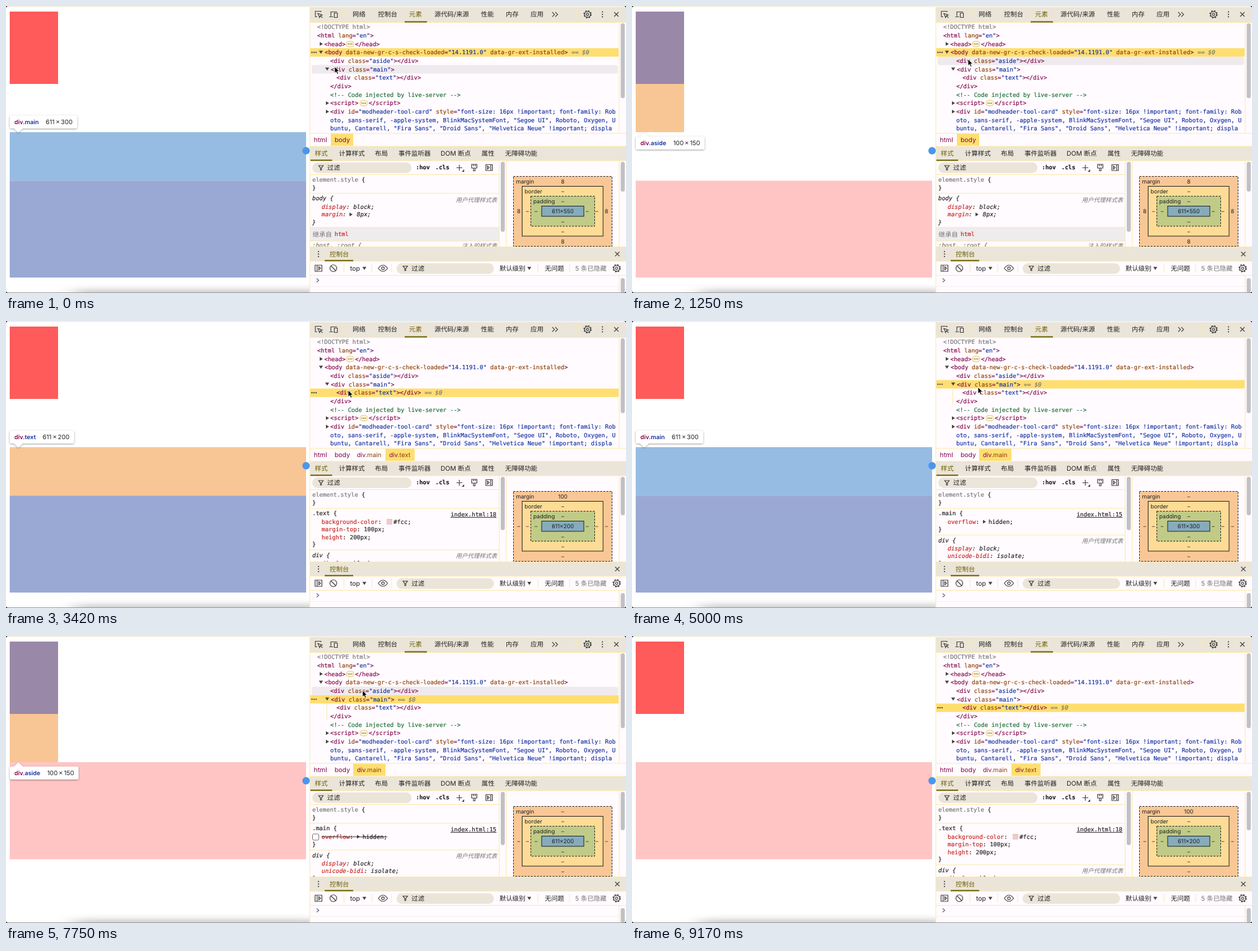
An HTML page that plays this animation: 1000x464 px, repeating every 9.26 s.

```html
<!DOCTYPE html>
<html lang="en">
<head>
<meta charset="utf-8">
<title>Inspector demo</title>
<style>
html, body { margin: 0; width: 100%; height: 100%; overflow: hidden; background: #fff; }
svg { display: block; width: 100%; height: 100%; }
text { white-space: pre; text-rendering: geometricPrecision; font-size: 10.4px; fill: #1f1f1f;
  font-family: Inter, "Noto Sans CJK SC", "Noto Sans CJK", sans-serif; }
.m { font-size: 9.45px; font-family: "DejaVu Sans Mono", "Liberation Mono", monospace; stroke: #1f1f1f; stroke-width: .16px; }
.tag { fill: #83064a; } .attr { fill: #8c3f06; } .val { fill: #12309f; }
.note { fill: #146c2e; } .dim { fill: #757575; } .prop { fill: #c5221f; }
.m.tag, .m .tag { stroke: #83064a; } .m .attr { stroke: #8c3f06; }
.m.val, .m .val { stroke: #12309f; } .m.note { stroke: #146c2e; }
.m.dim, .m .dim { stroke: #757575; } .m.prop, .m .prop { stroke: #c5221f; }
.i { font-style: italic; } .b { font-weight: 600; } .on { fill: #6d5e00; }
.bm { font-size: 9px; } .mid { text-anchor: middle; } .end { text-anchor: end; }
.ua { font-size: 9.5px; font-style: italic; fill: #757575; text-anchor: end; }
.tip { font-size: 10px; } .tip.b { font-size: 9.6px; }
.ic { fill: none; stroke: #46443f; stroke-width: 1.2; }
</style>
</head>
<body>
<svg id="stage" viewBox="0 0 1000 464" preserveAspectRatio="none"></svg>
<script>
const BG = '#fffbff', BAR = '#ebe5d9', LINE = '#fbe9a8', GOLD = '#ffde70', THUMB = '#c1c0c2', OLIVE = '#6d5e00';
const CH = 5.69, ROW = 13.67;
const rowY = i => 34 + ROW * i;

const esc = s => s.replace(/&/g, '&amp;').replace(/</g, '&lt;');
const span = (c, s) => `<tspan class="${c}">${esc(s)}</tspan>`;
const box = (x, y, x2, y2, fill, more = '') =>
  `<rect x="${x}" y="${y}" width="${x2 - x}" height="${y2 - y}" fill="${fill}" ${more}/>`;
const path = (d, more = 'class="ic"') => `<path d="${d}" ${more}/>`;
const fillPath = (d, c = '#46443f') => path(d, `fill="${c}"`);
const raw = (x, y, s, c = '', more = '') => `<text x="${x}" y="${y}" class="${c}" ${more}>${s}</text>`;
const label = (x, y, s, c = '') => raw(x, y + 3.8, esc(s), c);
const mono = (x, y, s, c = '') => raw(x, y + 3.4, s, 'm ' + c);
const hline = (x, x2, y, c = LINE) => box(x, y - .5, x2, y + .5, c);
const vline = (x, y, y2, c = LINE) => box(x - .5, y, x + .5, y2, c);
const underline = (x, x2, y) => box(x, y, x2, y + 2, OLIVE);
const dot = (x, y, r, c = '#46443f') => `<circle cx="${x}" cy="${y}" r="${r}" fill="${c}"/>`;
const ring = (x, y, r, more = '') => `<circle cx="${x}" cy="${y}" r="${r}" class="ic" ${more}/>`;
const group = (name, s) => `<g data-on="${name}">${s}</g>`;

const right = (x, y) => fillPath(`M${x - 2} ${y - 3}l5 3l-5 3z`);
const down = (x, y) => fillPath(`M${x - 3.2} ${y - 2.3}h6.4l-3.2 5z`);
const kebab = (x, y) => [-4, 0, 4].map(d => dot(x, y + d, 1.1)).join('');
const cross = (x, y) => path(`M${x - 3.5} ${y - 3.5}l7 7m0-7l-7 7`);
const gear = (x, y) => ring(x, y, 4.7) + ring(x, y, 5.8, 'style="stroke-width:1.6" stroke-dasharray="2.4 2.155"') + ring(x, y, 1.9);
const funnel = (x, y) => path(`M${x - 3.6} ${y - 3.5}h7.2l-2.8 3.8v3.4h-1.6v-3.4z`);
const pill = (x, y) => `<rect x="${x - 6}" y="${y - 4.3}" width="12" height="8.8" rx="4" fill="#fff8e6" stroke="#e8c969"/>` +
  [-2.7, 0, 2.7].map(d => dot(x + d, y, .9, '#6b5d20')).join('');

// Markup colouring
const code = s => s.replace(/("[^"]*"?)|(<\/?\w+|\/?>)|([\w-]+)/g,
  (m, v, t) => span(v ? 'val' : t ? 'tag' : 'attr', m));
const markup = (x, i, s) => mono(x, rowY(i), code(s), 'tag');

function page() {
  const overlay = (name, y, y2, c) => group(name, box(6, y, 484, y2, c));
  const tip = (name, x2, y, up, sel, w, h, sx) => group(name,
    `<g filter="url(#soft)">${box(6, y, x2, y + 21, '#fff', 'rx="3"')}` +
    fillPath(up ? `M13 ${y}l7-6.5l7 6.5z` : `M13 ${y + 21}l7 6.5l7-6.5z`, '#fff') + '</g>' +
    raw(13.5, y + 14, span('tag', 'div') + span('val', sel), 'tip b') +
    raw(sx, y + 14, `${w}\u2009×\u2009${h}`, 'tip'));
  return box(0, 0, 490, 464, '#fff') +
    box(6, 9, 84, 126, '#ff5b5b') +
    group('open', box(6, 282.4, 484, 439, '#ffc5c5')) +
    group('folded', box(6, 204, 484, 361, '#ffc5c5')) +
    group('tip-aside', box(6, 9, 84, 126, '#9a88a9') + box(6, 126, 84, 204, '#f8c694')) +
    overlay('main-open', 204, 282.4, '#97bce3') + overlay('main-open', 282.4, 439, '#99a9d3') +
    overlay('text-open', 204, 282.4, '#f8c694') + overlay('text-open', 282.4, 439, '#99a9d3') +
    overlay('text-folded', 126, 204, '#f8c694') +
    overlay('text-folded', 204, 361, '#99a9d3') + overlay('main-folded', 204, 361, '#99a9d3') +
    tip('tip-aside', 117, 211, true, '.aside', 100, 150, 66.5) +
    tip('tip-main', 115, 177, false, '.main', 611, 300, 64) +
    tip('main-folded', 115, 177, false, '.main', 611, 200, 64) +
    tip('text-open', 110, 177, false, '.text', 611, 200, 59) +
    tip('text-folded', 110, 99, false, '.text', 611, 200, 59) +
    `<rect x="110" y="460" width="400" height="14" fill="#777" opacity=".5" filter="url(#blur)"/>`;
}

function tabs() {
  const names = [[559, '网络'], [600, '控制台'], [691, '源代码/来源'], [766, '性能'], [806, '内存'], [846, '应用']];
  return box(490, 2, 1000, 26, BAR) + hline(490, 1000, 26.5) +
    path('M508 10v-1.5h-9v9h3') + path('M503 12l7 2.5l-3 1.2l-1.2 3zM507 15.5l3.5 3.5') +
    path('M524 16.5v-7h10M521.5 17.5h6') + path('M529.5 11.5h5v7h-5z') +
    vline(546, 7, 20) + names.map(([x, s]) => label(x, 13.5, s)).join('') +
    label(650, 13.5, '元素', 'on') + underline(643, 679, 24.6) + path('M881 10l3.7 3.7l-3.7 3.7M886 10l3.7 3.7l-3.7 3.7') +
    vline(920, 7, 20) + gear(938, 13.5) + kebab(962, 13.5) + vline(973, 7, 20) + cross(984.5, 13.5);
}

function tree() {
  const band = (name, i, c) => group(name, box(490.5, rowY(i) - 6.8, 988, rowY(i) + 6.8, c));
  const hover = (name, i) => group('row-' + name, box(493, rowY(i) - 6.8, 987, rowY(i) + 6.8, '#eeeaee', 'rx="4"'));
  const mark = (name, i, x) => group(name, mono(x, rowY(i), ` == ${span('i', '$0')}`, 'dim') +
    [493.5, 496.8, 500.1].map(d => dot(d, rowY(i), 1.15)).join(''));
  const open = (x, i) => down(x, rowY(i) - .5), shut = (x, i) => right(x, rowY(i));
  return band('sel-body', 3, GOLD) + band('sel-text', 6, GOLD) + band('gold-main', 5, GOLD) + band('pale-main', 5, '#f6eedf') +
    hover('aside', 4) + hover('main', 5) + hover('text', 6) + hover('script', 9) +
    group('sel-main', vline(517.5, 110, 136)) +
    mono(502, rowY(0), esc('<!DOCTYPE html>'), 'dim') +
    markup(502, 1, '<html lang="en">') +
    shut(508, 2) + markup(513.5, 2, '<head>') + pill(555, rowY(2)) + markup(563, 2, '</head>') +
    open(508, 3) + markup(514, 3, '<body data-new-gr-c-s-check-loaded="14.1191.0" data-gr-ext-installed>') +
    markup(523, 4, '<div class="aside"></div>') +
    open(518, 5) + markup(524, 5, '<div class="main">') +
    markup(533, 6, '<div class="text"></div>') + markup(523, 7, '</div>') +
    mono(523, rowY(8), esc('<!-- Code injected by live-server -->'), 'note') +
    shut(518, 9) + markup(523, 9, '<script>') + pill(577, rowY(9)) + markup(585, 9, '<\/script>') +
    shut(518, 10) + markup(523, 10, '<div id="modheader-tool-card" style="font-size: 16px !important; font-family: Rob') +
    mono(523, rowY(11), 'oto, sans-serif, -apple-system, BlinkMacSystemFont, "Segoe UI", Roboto, Oxygen, U', 'val') +
    mono(523, rowY(12), 'buntu, Cantarell, "Fira Sans", "Droid Sans", "Helvetica Neue" !important; displa', 'val') +
    mark('sel-body', 3, 514 + 69 * CH) + mark('sel-main', 5, 524 + 18 * CH) + mark('sel-text', 6, 533 + 24 * CH) +
    vline(989, 27, 205) + box(991.5, 28, 998, 149, THUMB, 'rx="3.2"');
}

function crumbs() {
  const hot = (name, x, x2) => group(name, box(x, 206.5, x2, 226, GOLD));
  const y = 219.8, small = 'style="font-size:10px"';
  return box(490, 205.5, 1000, 227, BG) + hline(490, 1000, 206) +
    hot('sel-body', 524, 560) + hot('sel-main', 560, 612) + hot('sel-text', 612, 659) +
    raw(496.5, y, 'html', 'tag') + raw(530, y, 'body', 'tag') +
    group('crumb-main', raw(566, y, span('tag', 'div') + span('attr', '.main'), '', small)) +
    group('sel-text', raw(618, y, span('tag', 'div') + span('attr', '.text'), '', small));
}

function styleHead() {
  const names = [[537, '计算样式'], [595, '布局'], [633, '事件监听器'], [701, 'DOM 断点'], [767, '属性'], [805, '无障碍功能']];
  return box(490, 227, 1000, 250, BAR) + hline(490, 1000, 227) + hline(490, 1000, 250) +
    names.map(([x, s]) => label(x, 238.3, s)).join('') + label(498, 238.3, '样式', 'on') + underline(491, 526, 248.4) +
    box(494, 253, 654, 270, BAR, 'rx="8.3"') + funnel(508, 261.5) + label(518, 261.3, '过滤') +
    mono(661, 261, ':hov', 'b') + mono(692.5, 261, '.cls', 'b') +
    path('M726.5 261.5h9.5M731.2 256.7v9.5') + fillPath('M739 264v4h-4z') +
    path('M751 256h8.5v6h-8.5zM754 256v3M757 256v3M754 262v4.5h2.5v-4.5') +
    path('M774 256.5h10.5v9.5h-10.5zM781.8 256.5v9.5M776.5 258.8l3 2.5l-3 2.5z') + hline(490, 795, 272.5);
}

function rules() {
  const prop = (y, name, val, c = '') => mono(509, y, span('prop', name) + ': ' + esc(val), c);
  const ua = (y, s) => raw(792, y + 3.4, s, 'ua');
  const link = s => mono(791, 312.5, s, 'end') + hline(717, 791, 317.5, '#333');
  const sep = y => hline(490, 795, y);
  const divRule = y => mono(494, y, 'div {', 'i') + ua(y + 1.5, '用户代理样式表') + prop(y + 12.7, 'display', 'block;', 'i');
  return mono(494, 280.5, span('dim', 'element.style') + ' {') + mono(494, 294, '}') + sep(303) +
    group('sel-body',
      mono(494, 311, 'body {', 'i') + ua(314, '用户代理样式表') +
      prop(324.5, 'display', 'block;', 'i') + prop(337, 'margin', '  8px;', 'i') + right(556, 337) +
      mono(494, 349.5, '}', 'i') + box(490.5, 358, 795, 380, '#efecee') + sep(358) + sep(380) +
      label(494.5, 369, '继承自', 'dim') + mono(530, 369, 'html', 'prop') +
      mono(494, 386.5, ':host, :root {', 'i dim') + ua(388, '注入的样式表')) +
    group('sel-text',
      mono(494, 311, '.text {') + link('index.html:18') +
      mono(509, 324.5, span('prop', 'background-color') + ':') + box(614.5, 320.5, 622.5, 328.5, '#ffc5c5', 'stroke="#bbb" stroke-width=".6"') +
      mono(625, 324.5, '#fcc;') + prop(337, 'margin-top', '100px;') + prop(349.5, 'height', '200px;') +
      mono(494, 361, '}') + sep(370) + divRule(378.5)) +
    group('sel-main',
      mono(494, 311, '.main {') + link('index.html:15') +
      mono(509, 324.5, span('prop', 'overflow') + ':') + right(568, 324.5) + mono(575, 324.5, 'hidden;') +
      mono(494, 337, '}') + sep(346) + divRule(354.5) + prop(379.8, 'unicode-bidi', 'isolate;', 'i') + mono(494, 392, '}', 'i')) +
    group('checked', box(494, 320, 504.5, 330.5, '#1a73e8', 'rx="2"') + path('M496.5 325l2 2.3l4-4.6', 'fill="none" stroke="#fff" stroke-width="1.4"')) +
    group('unchecked', box(494.5, 320, 504.5, 330, '#fff', 'rx="2" stroke="#767676"') + hline(509, 615, 324.8, '#333')) +
    vline(795.5, 250, 390) + vline(807, 250, 390) +
    group('sel-body', box(798, 252, 804.5, 365, THUMB, 'rx="3"')) +
    group('crumb-main', box(798, 252, 804.5, 338, THUMB, 'rx="3"'));
}

function boxModel() {
  const frame = (x, y, x2, y2, c, dash) =>
    box(x + .5, y + .5, x2 - .5, y2 - .5, c, `stroke="#222" ${dash ? 'stroke-dasharray="3 2"' : ''}`);
  const t = (x, y, s, c = 'mid', more = '') => raw(x, y + 3.2, s, 'bm ' + c, more);
  const dash = ([x, y]) => t(x, y, '–');
  return frame(818, 275, 978, 389, '#f9c795', 1) + frame(832, 291, 963.5, 372.5, '#ffdc95') +
    frame(846, 307, 950, 356.5, '#c0cb87', 1) + frame(863.5, 323, 932.5, 340.5, '#86acbc') +
    t(822.5, 283.5, 'margin', '') + t(836.5, 299.7, 'border', '') + t(850.5, 315.7, 'padding', '') +
    t(898, 283.5, '', 'mid', 'id="top"') +
    [[827, 332], [968.5, 332], [898, 380.3]].map(p => t(...p, '', 'mid side')).join('') +
    [[898, 299.5], [898, 315.5], [841, 332], [855, 332], [937.5, 332], [953, 332], [898, 348.3], [898, 364.3]].map(dash).join('') +
    t(898, 332, '', 'mid', 'id="size"') + vline(989, 250, 390) +
    group('sel-body', box(991.5, 252, 998, 300, THUMB, 'rx="3"')) +
    group('crumb-main', box(991.5, 252, 998, 314, THUMB, 'rx="3"'));
}

function drawer() {
  const y = 424;
  return box(490, 389, 1000, 464, BG) + box(490, 390, 1000, 412, BAR) + hline(490, 1000, 389.5) + hline(490, 1000, 412.5) +
    kebab(504, 401) + label(522, 401, '控制台', 'on') + underline(514, 560, 410.6) + cross(986, 401) +
    path('M498.5 419h11v10h-11zM501.8 419v10M504.5 421.5l3 2.5l-3 2.5z') +
    ring(528, y, 5.5) + path('M524 420l8 8') + vline(545, 417, 431) +
    label(555, y, 'top') + down(578, y) + vline(590, 417, 431) +
    path('M600.5 424q7.5-10 15 0q-7.5 10-15 0z') + ring(608, y, 2.2) + vline(622, 417, 431) +
    box(630, 416, 787, 433, BAR, 'rx="8.3"') + funnel(644, y) + label(654, y, '过滤') +
    label(796, y, '默认级别') + down(844, y) + vline(858, 417, 431) + label(869, y, '无问题') +
    vline(909, 417, 431) + label(918, y, '5 条已隐藏', 'dim') + gear(985, y) +
    hline(490, 1000, 435.5) + path('M501 440.5l3.5 3l-3.5 3', 'fill="none" stroke="#66718c" stroke-width="1.3"') +
    hline(490, 989, 453.5, '#f3eff3') + vline(989, 436, 464) + box(991.5, 440, 998, 464, THUMB, 'rx="3"');
}

const stage = document.getElementById('stage');
stage.innerHTML = `<defs>
  <filter id="soft" x="-20%" y="-50%" width="140%" height="200%"><feDropShadow dx="0" dy="1" stdDeviation="1.6" flood-opacity=".38"/></filter>
  <filter id="blur" x="-20%" y="-200%" width="140%" height="500%"><feGaussianBlur stdDeviation="16 6"/></filter></defs>` +
  page() + box(490, 0, 1000, 464, BG) + tree() + crumbs() + styleHead() + rules() + boxModel() + drawer() + tabs() +
  vline(490, 2, 464) + dot(484, 234, 6, '#4b96ea') +
  box(0, 0, 1000, 1.5, '#f3edd9') + box(0, 463, 1000, 464, '#9a9a9a') +
  fillPath('M0 0h4q-4 0-4 4zM1000 0h-4q4 0 4 4zM0 464v-4q0 4 4 4zM1000 464v-4q0 4-4 4z', '#111') +
  path('M0 0v10.5l2.5-2.2l1.7 3.9l1.9-.8l-1.7-3.8h3.2z', 'id="cursor" fill="#000" stroke="#fff" stroke-width=".8"');

// Timeline: hovered row, selection and pointer path
const LOOP = 9260, STEP = 250 / 3, FOLD = 5750;
const hovers = [[0, 'main'], [250, 'aside'], [1700, 'main'], [2080, 'text'], [4250, 'main'], [5170, ''], [6250, 'script'],
  [6420, 'text'], [6750, 'main'], [7420, 'aside'], [8170, 'main'], [8330, 'text'], [8850, '']];
const picks = [[0, 'body'], [2330, 'text'], [4420, 'main'], [8500, 'text']];
const route = [[0, 530, 98], [250, 537, 94], [920, 542, 86], [1580, 542, 86], [1900, 546, 104], [2300, 550, 113], [3420, 552, 112],
  [4000, 553, 112], [4420, 557, 105], [5000, 558, 107], [5500, 515, 305], [5700, 499, 323], [5950, 499, 323], [6250, 567, 172],
  [6330, 573, 137], [6600, 576, 113], [6900, 575, 103], [7250, 575, 101], [7600, 575, 88], [7920, 575, 88], [8400, 577, 112],
  [8800, 578, 114], [8920, 600, 250], [9000, 640, 385], [9100, 660, 475]];

const at = (list, t) => list.filter(e => e[0] <= t).pop()[1];
function pointer(t) {
  const k = route.findIndex(p => p[0] > t);
  if (k < 0) return route[route.length - 1].slice(1);
  const [a, ax, ay] = route[k - 1], [b, bx, by] = route[k];
  const u = (t - a) / (b - a), e = u * u * (3 - 2 * u);
  return [ax + (bx - ax) * e, ay + (by - ay) * e];
}

const parts = [...stage.querySelectorAll('[data-on]')];
const sides = [...stage.querySelectorAll('.side')];
const get = id => document.getElementById(id);

function draw(ms) {
  const t = Math.floor((ms % LOOP + 5) / STEP) * STEP + .01;
  const hover = at(hovers, t), pick = at(picks, t), folded = t >= FOLD;
  const page = folded ? 'folded' : 'open', on = new Set([page, 'sel-' + pick]);
  if (hover && hover !== pick) on.add('row-' + hover);
  on.add(`${hover}-${page}`);
  if (hover === 'aside' || (hover === 'main' && !folded)) on.add('tip-' + hover);
  if (pick !== 'body') on.add('crumb-main');
  if (pick === 'main') {
    on.add(folded && t < 6900 ? 'pale-main' : 'gold-main');
    if (folded) on.add('unchecked');
    else if (t > 5400) on.add('checked');
  }
  for (const p of parts) p.style.display = on.has(p.dataset.on) ? '' : 'none';
  get('top').textContent = { body: '8', text: '100', main: '–' }[pick];
  for (const s of sides) s.textContent = pick === 'body' ? '8' : '–';
  get('size').textContent = '611×' + (pick === 'body' ? 550 : pick === 'main' && !folded ? 300 : 200);
  get('cursor').setAttribute('transform', `translate(${pointer(t).map(v => v.toFixed(1))})`);
}

const start = performance.now();
function tick() {
  draw(performance.now() - start);
  requestAnimationFrame(tick);
}
tick();
</script>
</body>
</html>
```
